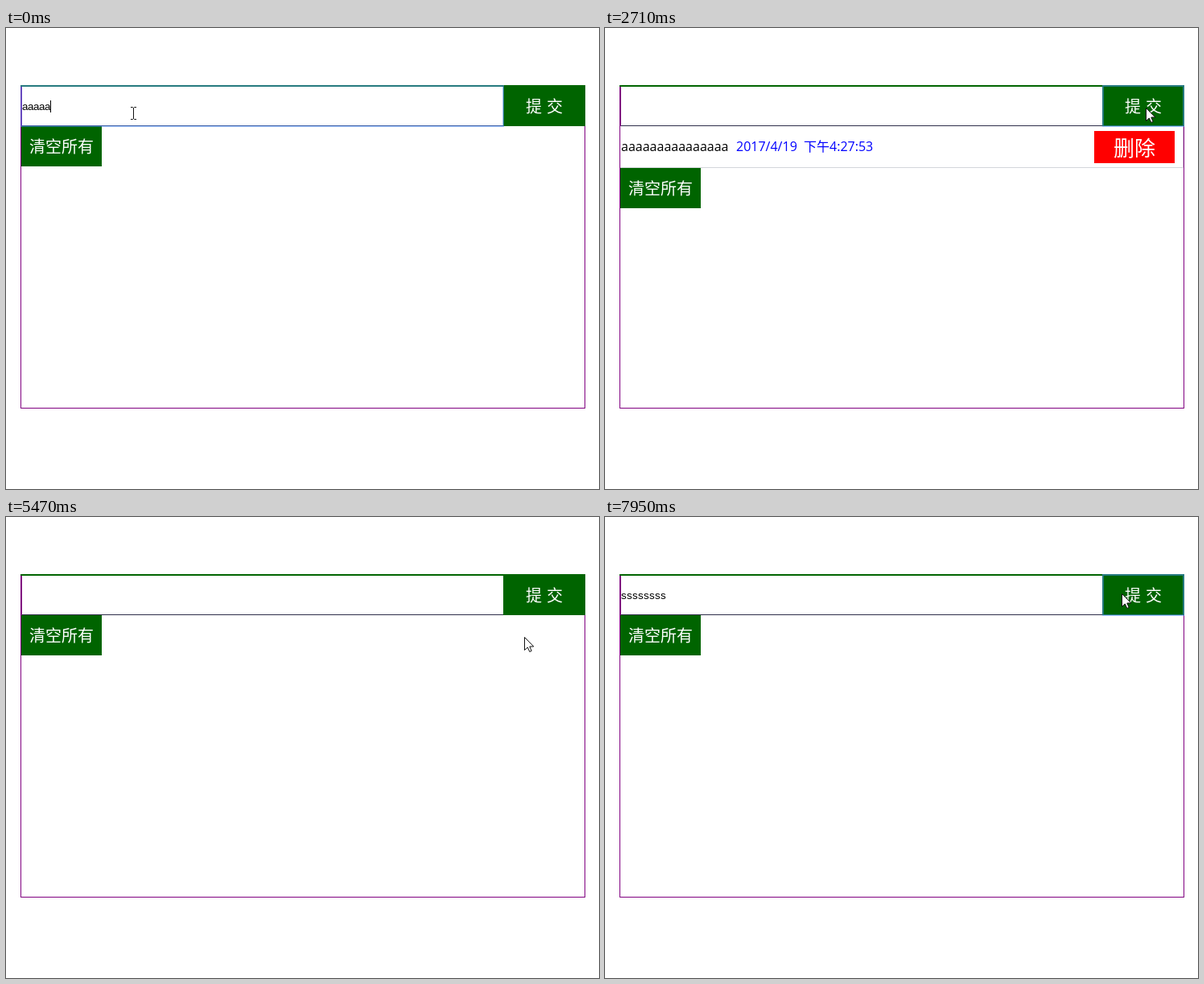
These frames come from a looping animation (737x573 px, 8000 ms). An HTML page:

```html
<!DOCTYPE html>
<html lang="zh">
<head>
<meta charset="utf-8">
<style>
html, body { margin: 0; width: 100%; height: 100%; overflow: hidden; background: #fff; }
svg { display: block; width: 737px; height: 573px; }
text { white-space: pre; }
rect { shape-rendering: crispEdges; }
.cjk { font-family: "Noto Sans CJK SC", "Noto Sans CJK", sans-serif; fill: #fff; font-size: 20px; }
.item { font: 16px "Open Sans", "Noto Sans", sans-serif; }
.typed { font: 13.333px "Liberation Sans", sans-serif; }
.ring { fill: none; stroke: #4d90fe; stroke-width: 2; stroke-opacity: .5; }
</style>
</head>
<body>
<svg viewBox="0 0 737 573">
  <rect x="18.5" y="71.5" width="701" height="401" fill="#fff" stroke="#800080"/>
  <rect x="18" y="71" width="2" height="51" fill="#800080"/>
  <rect x="18" y="71" width="601" height="2" fill="#006400"/>
  <rect x="20" y="121" width="700" height="1" fill="#2e2e4a"/>
  <rect x="618" y="71" width="102" height="51" fill="#006400"/>
  <text class="cjk" y="105"><tspan x="646">提</tspan><tspan x="672">交</tspan></text>

  <g id="item">
    <path d="M19 173.5H718.5V123" fill="none" stroke="#d3d6da"/>
    <text class="item" x="20" y="153">aaaaaaaaaaaaaaa</text>
    <text class="item" y="153" fill="#00f"><tspan x="163">2017/4/19</tspan><tspan
      class="cjk" x="247" style="font-size:16px;fill:#00f">下午</tspan><tspan x="279">4:27:53</tspan></text>
    <rect x="608" y="128" width="100" height="40" fill="#f00"/>
    <text class="cjk" x="632" y="159" style="font-size:26px">删除</text>
  </g>

  <g id="clear">
    <rect x="19" y="122" width="100" height="50" fill="#006400"/>
    <text class="cjk" x="29" y="155">清空所有</text>
  </g>

  <rect class="ring" id="inputRing" x="19" y="72" width="599" height="50"/>
  <rect class="ring" id="submitRing" x="619" y="72" width="100" height="50"/>
  <rect class="ring" id="deleteRing" x="608" y="128" width="100" height="40"/>

  <text class="typed" id="typed" y="102"></text>
  <rect id="caret" y="90" width="1" height="15"/>

  <path id="arrow" d="M.5 .5V16.5L4.3 13 6.8 18.5 9.2 17.4 6.8 12H11.8Z" fill="#fff" stroke="#111"/>
  <path id="beam" d="M-3.5 -7.5H-1M1 -7.5H3.5M-1 -7.5L0 -6.5 1 -7.5M0 -7V7M-3.5 7.5H-1M1 7.5H3.5M-1 7.5L0 6.5 1 7.5"
    fill="none" stroke="#111"/>
</svg>
<script>
const LOOP = 8000, PITCH = 7;
const el = id => document.getElementById(id);
const show = (id, on) => el(id).setAttribute('visibility', on ? 'visible' : 'hidden');
const move = (id, x, y) => el(id).setAttribute('transform', `translate(${x} ${y})`);

// Pointer stops: time, x, y, shape
const pointer = [
  [0, 158, 106, 'beam'], [435, 157, 106, 'beam'], [590, 156, 105, 'beam'],
  [860, 165, 106, 'beam'], [1010, 182, 107, 'beam'], [1130, 196.5, 107.5, 'beam'],
  [1250, 245, 110, 'beam'], [1380, 325, 112, 'beam'], [1500, 415, 113, 'beam'],
  [1630, 505, 113, 'beam'], [1750, 580, 112, 'beam'], [1880, 626, 110, 'arrow'],
  [2030, 650, 105, 'arrow'], [2180, 665, 101, 'arrow'], [2310, 672, 99, 'arrow'],
  [3550, 610, 115, 'arrow'], [3680, 525, 138, 'arrow'], [3820, 460, 154, 'arrow'],
  [3970, 439, 158, 'arrow'], [4090, 470, 169, 'arrow'], [4220, 540, 173, 'arrow'],
  [4350, 610, 162, 'arrow'], [4470, 644, 149, 'arrow'],
  [5750, 595, 134, 'arrow'], [5880, 520, 114, 'beam'], [6010, 440, 103, 'beam'],
  [6150, 400, 99, 'beam'], [6950, 399, 103, 'beam'],
  [7370, 460, 104, 'beam'], [7510, 555, 102, 'beam'], [7660, 625, 97, 'arrow'],
  [7800, 642, 95, 'arrow']
];
const firstKeys = [280, 860, 1010, 1130, 1250, 1380, 1500, 1630, 1750, 1880];
const secondKeys = [6560, 6560, 6680, 6680, 6810, 6950, 6950, 7100];
const pressed = (keys, t) => keys.filter(k => k <= t).length;

function draw(t) {
  const between = (from, to) => t >= from && t < to;
  const hasItem = between(2710, 5470);
  const inputFocus = t < 2580 || between(6280, 7950);

  show('item', hasItem);
  move('clear', 0, hasItem ? 52 : 0);
  show('inputRing', inputFocus);
  show('submitRing', between(2580, 5320) || t >= 7950);
  show('deleteRing', between(5320, 5470));

  const text = t < 2710 ? 'a'.repeat(5 + pressed(firstKeys, t)) : 's'.repeat(pressed(secondKeys, t));
  el('typed').textContent = text;
  el('typed').setAttribute('x', [...text].map((_, i) => 20 + PITCH * i).join(' '));
  el('caret').setAttribute('x', (text ? 20 : 19.5) + PITCH * text.length);
  show('caret', inputFocus);

  const [, x, y, shape] = pointer.findLast(p => p[0] <= t);
  for (const id of ['arrow', 'beam']) {
    show(id, id === shape);
    move(id, x + (id === 'beam' ? .5 : 0), y);
  }
}

const start = performance.now();
function tick() {
  draw((performance.now() - start) % LOOP);
  requestAnimationFrame(tick);
}
tick();
</script>
</body>
</html>
```
